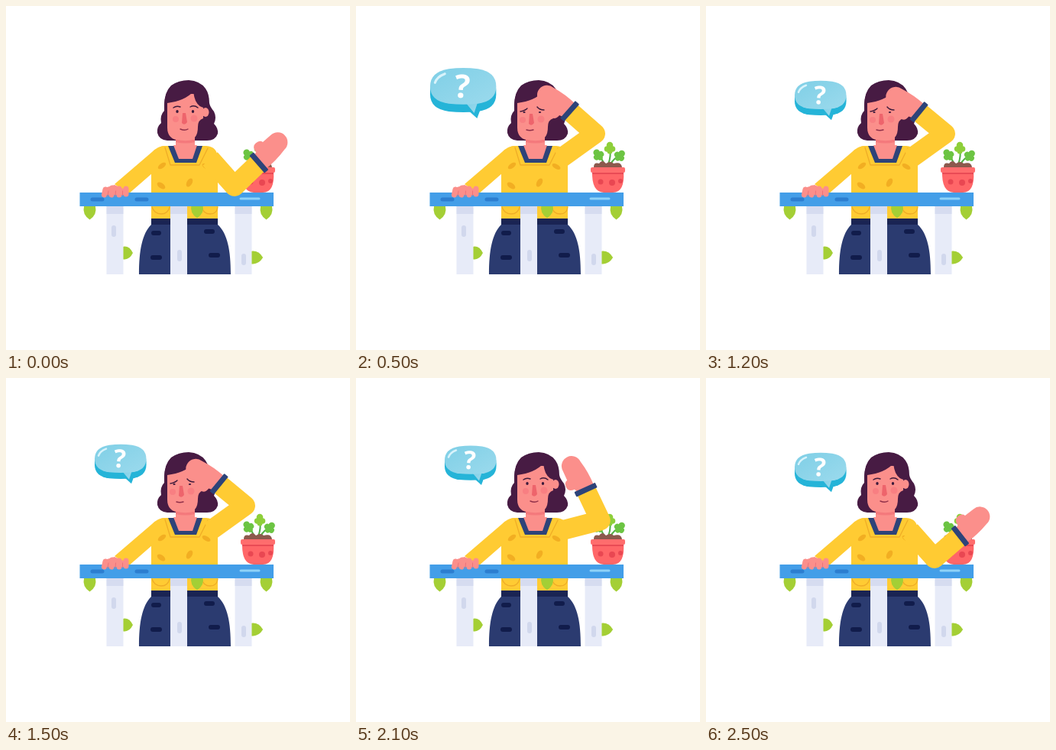
Animation, 450 px wide and 450 px high, one loop 2.6 s. Source, as an HTML page:

```html
<!DOCTYPE html>
<html lang="en">
<head>
<meta charset="utf-8">
<title>Thinking woman</title>
<style>
  html, body { margin: 0; height: 100%; overflow: hidden; background: #fff; }
  svg { display: block; width: 100vw; height: 100vh; }
  .line { fill: none; stroke-linecap: round; stroke-linejoin: round; }
</style>
</head>
<body>
<svg viewBox="0 0 450 450">
  <defs>
    <path id="leaf" d="M-7.500 0H7.500Q10 11 0 17.500Q-10 11 -7.500 0Z" fill="#a4cf35"/>
    <path id="bubbleFace" d="M135 93Q150 91 165 93Q183.500 96 183.500 111Q183.500 126 165 128.500Q150 130 135 128.500Q116 126 116 111Q116 96 135 93Z"/>
    <g id="leg">
      <path d="M0 258H22V351H0Z" fill="#e7ebf8"/>
      <path d="M0 258H22V272H0Z" fill="#d6dcf0"/>
    </g>
    <g id="sprig">
      <circle cx="-3.500" cy="1" r="3.800"/><circle cx="0" cy="-4" r="4.300"/><circle cx="3.500" cy="1" r="3.800"/><circle cy="4" r="3.500"/>
    </g>
    <linearGradient id="sky" x2="1" y2="1">
      <stop stop-color="#7fcfe6"/><stop offset="1" stop-color="#9bdaed"/>
    </linearGradient>
  </defs>

  <!-- trousers -->
  <path d="M190 277H277V286C290 298 294 320 294 351H174C174 320 178 298 190 286Z" fill="#2b3b70"/>
  <path d="M190 277H277V286H190Z" fill="#1a2453"/>
  <g class="line" stroke="#111c4b" stroke-width="6">
    <path d="M193 297H200M192 329H201M262 295H270M268 326H277"/>
  </g>

  <!-- jumper -->
  <path d="M207 183H262Q277 184 277 200V278H190V200Q194 184 207 183Z" fill="#ffcb33"/>
  <path d="M208 183Q199 183 191 191L142 233L160 246L191 219L212 196Z" fill="#ffcb33"/>
  <g fill="#f2ae22">
    <ellipse cx="203" cy="235" rx="6" ry="3.500" transform="rotate(35 203 235)"/>
    <ellipse cx="240" cy="231" rx="6" ry="3.500" transform="rotate(-60 240 231)"/>
    <ellipse cx="204" cy="209" rx="6" ry="3" transform="rotate(-35 204 209)"/>
    <ellipse cx="262" cy="210" rx="6" ry="3" transform="rotate(30 262 210)"/>
  </g>
  <g class="line" stroke="#efad27" stroke-width="1.300">
    <path d="M208 185L215 208H253L264 186M191 263Q194 272 203 272T214 263M256 263Q258 272 267 272T277 263"/>
  </g>
  <path d="M212 183L221 205H249L257 183Z" fill="#2d4379"/>
  <path d="M219 182L226 200H244L250 182Z" fill="#fb8f8b"/>
  <path d="M222 165H247V186H222Z" fill="#fb8f8b"/>

  <!-- head -->
  <path d="M207 130Q207 113 216 104Q226 97 239 97Q254 98 261 108Q266 115 266 127Q267 132 272 138Q276 146 272 154Q278 160 277 167Q274 176 263 176H211Q200 175 198 166Q197 158 203 153Q201 143 207 137Z" fill="#471b43"/>
  <path d="M222 165H247V182H222Z" fill="#fb8f8b"/>
  <path d="M211 115H258V147Q251 149 251 158Q251 175 238 176H228Q211 175 211 159Z" fill="#fb8f8b"/>
  <path d="M222 174.500Q235 178 247 174.500V178Q235 181 222 178Z" fill="#f4797c"/>
  <ellipse cx="261" cy="139" rx="4.500" ry="6" fill="#fb8f8b"/>
  <path d="M207 133Q207 113 217 104Q226 97 240 98Q260 100 264 122L262 133Q253 134 248 124Q246 119 245 112Q234 124 211 127Z" fill="#471b43"/>
  <g id="face">
    <g fill="#f87f82"><circle cx="222" cy="148" r="4"/><circle cx="246" cy="147" r="4.500"/></g>
    <path d="M231 140H235L237 152Q233.500 157 230 153Z" fill="#ee646c"/>
    <g fill="#3b1a3b"><ellipse class="eye" cx="224" cy="138" rx="1.700"/><ellipse class="eye" cx="244.500" cy="138" rx="1.700"/></g>
  </g>
  <g class="line" stroke="#3b1a3b" stroke-width="1.400">
    <path id="browL"/><path id="browR"/>
    <path id="mouth" stroke="#8f2f49"/>
  </g>

  <!-- table -->
  <use href="#leaf" transform="translate(152 323) rotate(-90) scale(1.050 .8)"/>
  <use href="#leaf" transform="translate(319 329) rotate(-90) scale(1.050 .98)"/>
  <use href="#leg" x="131.500"/><use href="#leg" x="215"/><use href="#leg" x="299.500"/>
  <g class="line" stroke="#d1d8ed" stroke-width="6">
    <path d="M141 290V299M227 322V331M311 327V336"/>
  </g>
  <use href="#leaf" x="109.500" y="262"/><use href="#leaf" x="250" y="260"/><use href="#leaf" x="340.500" y="262"/>
  <path d="M96.500 244H350V262H96.500Z" fill="#439ee8"/>
  <path class="line" d="M113 253H126M171 253H184" stroke="#2c7ed0" stroke-width="5"/>
  <path class="line" d="M307 252H331" stroke="#8ed2f8" stroke-width="3"/>

  <!-- resting hand -->
  <path d="M142 234L160 242V247H126L129 238Z" fill="#fb8f8b"/>
  <path class="line" d="M130 240L128.500 247M139 238L138 247M148 239V247M157 239V246" stroke="#fb8f8b" stroke-width="7"/>
  <path class="line" d="M134 242L133 249M143.500 242L143 249M152.500 242V248" stroke="#ec737a" stroke-width="1"/>

  <!-- plant -->
  <path class="line" d="M325 207Q322 200 317 195M330 207Q334 196 332 187M333 207Q337 199 345 196" stroke="#4fae45" stroke-width="2"/>
  <g fill="#6cc443">
    <use href="#sprig" transform="translate(317 195) rotate(-35)"/>
    <use href="#sprig" transform="translate(345 196) rotate(40)"/>
  </g>
  <use href="#sprig" x="332" y="186" fill="#8ecf3a"/>
  <path d="M311 211Q311 204 318 206Q322 200 327 206Q333 202 337 206Q347 203 348 211Z" fill="#8c594d"/>
  <path d="M309 216H350Q352 244 336 244H324Q308 243 309 216Z" fill="#ff6668"/>
  <rect x="307" y="211" width="45" height="7" rx="2" fill="#ff6d6d"/>
  <path d="M309 218H350V220H309Z" fill="#e94b55"/>
  <g fill="#e94752"><circle cx="320" cy="230" r="3.500"/><circle cx="335" cy="231" r="4"/><circle cx="346" cy="229" r="3"/></g>

  <!-- moving arm -->
  <path id="sleeve" fill="none" stroke="#ffcb33" stroke-width="26" stroke-linejoin="round"/>
  <g id="hand">
    <path d="M0 -11L6 -13Q6 -22 13 -22Q20 -22 21 -17L35 -17A13 13 0 0 1 36 9Q18 13 0 12Z" fill="#fb8f8b"/>
    <rect x="-4" y="-15" width="7" height="30" rx="1" fill="#2d4379"/>
  </g>

  <!-- question bubble -->
  <g id="bubble">
    <g fill="#25b4d8">
      <path d="M149 130L164 143.500L169 130Z"/>
      <use href="#bubbleFace" y="8"/><use href="#bubbleFace" y="4"/>
    </g>
    <g fill="url(#sky)">
      <path d="M151 126L161 138L165 126Z"/>
      <use href="#bubbleFace"/>
    </g>
    <path class="line" d="M121 107Q123 101 131 98" stroke="#d8f3fb" stroke-width="2.500"/>
    <text x="149" y="122.500" text-anchor="middle" transform="rotate(4 149 110)" fill="#fff" font-family="'Noto Sans', 'Open Sans', sans-serif" font-weight="700" font-size="33">?</text>
  </g>
</svg>
<script>
const LOOP = 2600, TAU = 2 * Math.PI;
const $ = id => document.getElementById(id);
const lerp = (a, b, p) => a + (b - a) * p;
const clamp = x => Math.min(1, Math.max(0, x));
const ease = (t, from, to) => (1 - Math.cos(Math.PI * clamp((t - from) / (to - from)))) / 2;
const polar = ([x, y], deg, r) => [x + r * Math.cos(deg * TAU / 360), y + r * Math.sin(deg * TAU / 360)];

// value at t on a list of [time, value] points
function along(keys, t) {
  let i = 1;
  while (i < keys.length - 1 && t > keys[i][0]) i++;
  const [[t0, a], [t1, b]] = [keys[i - 1], keys[i]];
  return lerp(a, b, clamp((t - t0) / (t1 - t0)));
}

function curve(id, a, b, p) {
  const v = a.map((n, i) => lerp(n, b[i], p).toFixed(2));
  $(id).setAttribute("d", `M${v[0]} ${v[1]}Q${v.slice(2)}`);
}

function drawArm(t) {
  const back = ease(t, 1900, 2500);
  const upper = ease(t, 0, 500) - back;
  const fore = ease(t, 0, 550) - back;
  const shoulder = [267, 200];
  const elbow = polar(shoulder, lerp(48.4, -35.7, upper), lerp(48, 56.6, upper));
  const angle = lerp(t < 1000 ? -44 : -41, -140.5, fore);
  const wrist = polar(elbow, angle, 45);
  $("sleeve").setAttribute("d", `M${shoulder}L${elbow}L${wrist}`);
  $("hand").setAttribute("transform", `translate(${wrist}) rotate(${angle + lerp(3, 0, fore)})`);
}

function drawFace(t) {
  const worry = ease(t, 100, 500) - ease(t, 1720, 2050);
  $("face").setAttribute("transform", `translate(${-4 * worry} ${worry})`);
  for (const eye of document.querySelectorAll(".eye")) eye.setAttribute("ry", lerp(2.1, 1.1, worry));
  curve("browL", [219, 133, 223, 130, 228, 132], [215, 138, 221, 137, 224, 134], worry);
  curve("browR", [241, 132, 246, 129, 251, 133], [237, 132, 240, 136, 246, 136], worry);
  curve("mouth", [228, 161, 234, 163.5, 238, 161], [223, 162, 227, 163.5, 232, 162], worry);
}

function drawBubble(t) {
  const size = along([[80, 0], [400, 1.1], [500, 1.28], [600, 1.24], [800, 1.04], [900, .985], [1000, 1]], t);
  const drift = along([[400, 6], [500, 3.5], [600, -2.5], [900, 0]], t);
  const float = 6 * ease(t, 900, 1225) * Math.cos(TAU * (t - 1875) / 650);
  $("bubble").setAttribute("transform",
    `translate(184 ${143.5 + drift + float}) scale(${size}) translate(-184 -143.5)`);
}

function frame() {
  const t = performance.now() % LOOP;
  drawArm(t);
  drawFace(t);
  drawBubble(t);
  requestAnimationFrame(frame);
}
frame();
</script>
</body>
</html>
```
